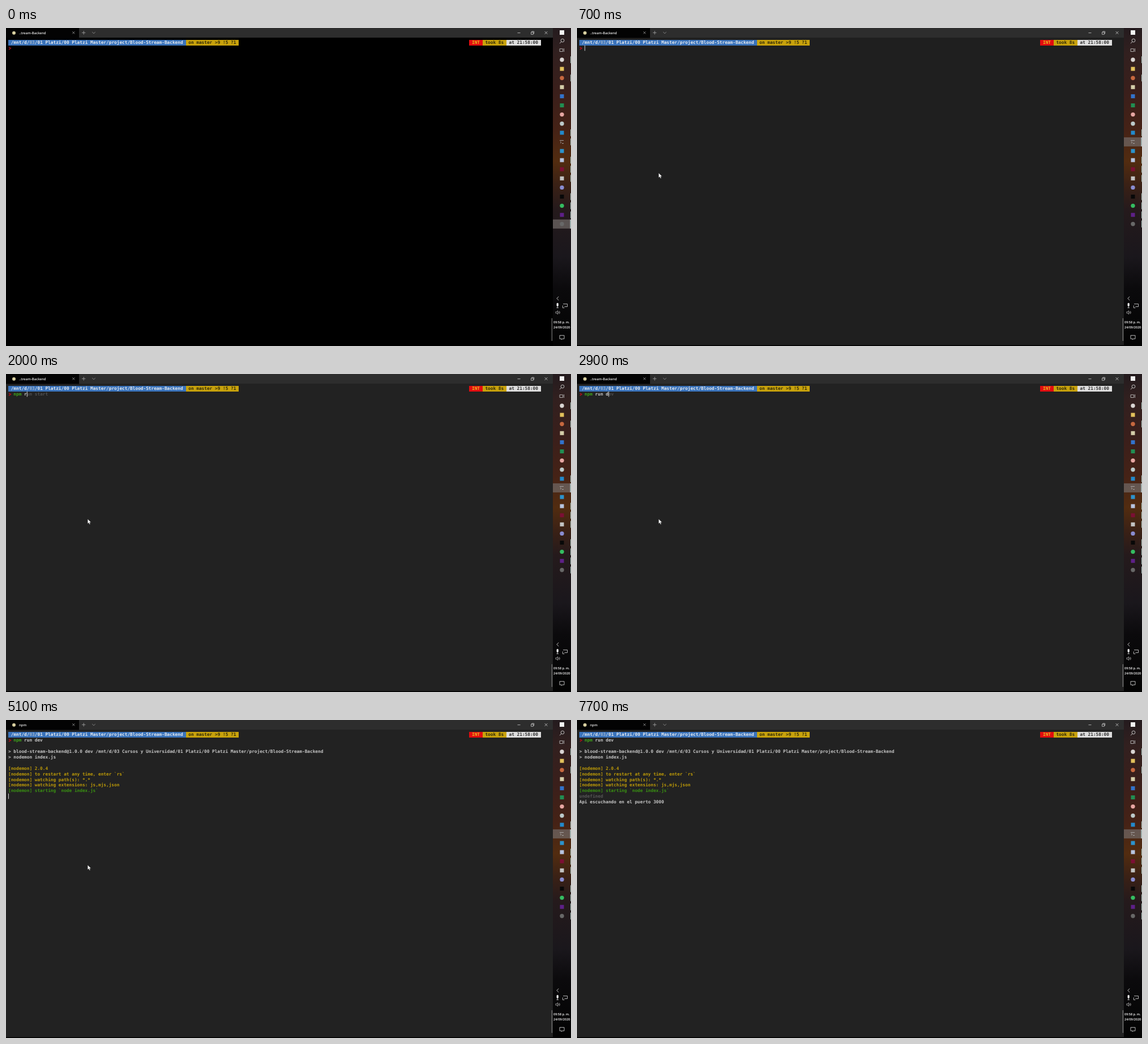
These frames come from a looping animation (998x561 px, 7800 ms). An HTML page:

```html
<!DOCTYPE html>
<html lang="es">
<head>
<meta charset="utf-8">
<title>Terminal</title>
<style>
  html, body { margin: 0; width: 100%; height: 100%; overflow: hidden; background: #000; }
  svg { display: block; width: 998px; height: 561px; }
  text { white-space: pre; text-rendering: geometricPrecision; }
  .mono { font: bold 7.774px "DejaVu Sans Mono", monospace; }
  .ui { font-family: "Open Sans", "Noto Sans", sans-serif; font-weight: 600; }
</style>
</head>
<body>
<svg id="stage" viewBox="0 0 998 561">
  <defs>
    <linearGradient id="wall" x1="0" y1="0" x2="0" y2="1">
      <stop offset="0" stop-color="#241b1e"/>
      <stop offset=".08" stop-color="#32201f"/>
      <stop offset=".2" stop-color="#3a1f1b"/>
      <stop offset=".32" stop-color="#452216"/>
      <stop offset=".42" stop-color="#522c10"/>
      <stop offset=".5" stop-color="#382016"/>
      <stop offset=".57" stop-color="#251a1c"/>
      <stop offset=".72" stop-color="#1a171c"/>
      <stop offset=".82" stop-color="#0b0a0c"/>
      <stop offset="1" stop-color="#030303"/>
    </linearGradient>
  </defs>
</svg>
<script>
const LOOP = 7800, STEP = 100;
const CELL = 4.68, ROW = 9.9, LEFT = 4, TOP = 25.6;
const GREY = '#c6c6c6', YELLOW = '#bd9a08', GREEN = '#3a9212';
const stage = document.getElementById('stage');

function add(tag, attrs, parent = stage) {
  const el = document.createElementNS('http://www.w3.org/2000/svg', tag);
  for (const key in attrs) el.setAttribute(key, attrs[key]);
  parent.appendChild(el);
  return el;
}
const rect = (x, y, width, height, fill) => add('rect', { x, y, width, height, fill });
const line = (d, stroke = '#ccc', width = 0.8) =>
  add('path', { d, stroke, fill: 'none', 'stroke-width': width });
const colX = col => LEFT + col * CELL;
const rowY = row => TOP + row * ROW;

function print(col, row, str, fill = GREY) {
  const el = add('text', { x: colX(col), y: rowY(row) + 2.75, fill, class: 'mono' });
  el.textContent = str;
  return el;
}
function label(x, y, str, size, fill = '#eee') {
  const el = add('text', { x, y, fill, 'font-size': size, class: 'ui' });
  el.textContent = str;
  return el;
}
function segment(col, str, back, fore) {
  const box = rect(colX(col), 20.5, str.length * CELL, 10.2, back);
  box.setAttribute('shape-rendering', 'crispEdges');
  print(col, 0, str, fore);
}
const show = (el, on) => el.setAttribute('visibility', on ? 'visible' : 'hidden');

// Window
const screen = rect(0, 0, 966, 559.5, '#000');
rect(0, 0, 966, 17, '#2d2d2d');
rect(0, 0, 129, 17.5, '#030303');
add('circle', { cx: 14, cy: 8.8, r: 3, fill: '#d8cfa0' });
const title = label(23, 10.8, '', 6);
line('M117.3 6.3l4 4m0-4l-4 4', '#aaa');
line('M134 8.3h6.4m-3.2-3.2v6.4', '#aaa');
line('M152.2 7l2.8 2.7 2.8-2.7', '#999');
line('M903.5 8.6h5', '#ccc');
line('M927.5 7.4h3.8v3.8h-3.8zM928.8 7.2v-1.2h3.8v3.9h-1.2', '#ccc');
line('M951.6 6l4.8 4.8m0-4.8l-4.8 4.8', '#ccc');

// Prompt
const BLUE = '#3a73bb', GOLD = '#c8a20c';
segment(0, ' /mnt/d/', BLUE, '#e6ebf0');
segment(8, '03', BLUE, '#9fb4cd');
segment(10, '/01 Platzi/00 Platzi Master/project/Blood-Stream-Backend ', BLUE, '#e6ebf0');
segment(67, ' on master >9 !5 ?1 ', GOLD, '#302a08');
segment(174, ' INT ', '#e20c10', '#e8c020');
segment(179, ' took 8s ', GOLD, '#302a08');
segment(188, ' at 21:58:00 ', '#dedede', '#2e2e2e');
const mark = line('M5 33.6l3.4 2.2-3.4 2.2', '#a81018', 1.5);

// Command line
const command = print(2, 1, '');
const cmdName = add('tspan', {}, command);
const cmdArgs = add('tspan', { fill: GREY }, command);
const hint = add('tspan', { fill: '#505050' }, command);

const TYPING = [
  [1300, 'n'], [1500, 'np'], [1700, 'npm'], [1800, 'npm '], [2000, 'npm r'],
  [2200, 'npm ru'], [2400, 'npm run'], [2600, 'npm run '], [2900, 'npm run d'],
  [3100, 'npm run de'], [3300, 'npm run dev']
];
const FOCUS = 700, ENTER = 3900;

// Output: time, row, text, colour
const NOTE = '[nodemon] ';
const OUTPUT = [
  [4500, 3, '> blood-stream-backend@1.0.0 dev /mnt/d/03 Cursos y Universidad/01 Platzi/00 Platzi Master/project/Blood-Stream-Backend', GREY],
  [4500, 4, '> nodemon index.js', GREY],
  [4900, 6, NOTE + '2.0.4', YELLOW],
  [4900, 7, NOTE + 'to restart at any time, enter `rs`', YELLOW],
  [4900, 8, NOTE + 'watching path(s): *.*', YELLOW],
  [4900, 9, NOTE + 'watching extensions: js,mjs,json', YELLOW],
  [4900, 10, NOTE + 'starting `node index.js`', GREEN],
  [6200, 11, 'undefined', '#565656'],
  [6200, 12, 'Api escuchando en el puerto 3000', GREY]
].map(([at, row, str, fill]) => ({ at, row, el: print(0, row, str, fill) }));

const caret = rect(0, 0, 1, 9.6, '#d0d0d0');
rect(963.8, 512, 1.1, 40, '#858585');

// Taskbar
rect(966, 0, 32, 561, 'url(#wall)');
const active = rect(966, 0, 32, 16, '#716a67');
active.setAttribute('opacity', 0.72);
const activeEdge = rect(996.4, 0, 1.6, 16, '#b9c3c8');

rect(978, 4, 8, 8, '#f2f2f2');
add('circle', { cx: 983, cy: 22, r: 2.9, fill: 'none', stroke: '#ccc', 'stroke-width': 0.9 });
line('M981 24.2l-3 3', '#ccc', 1);
line('M978 36.7h5.5v4.8h-5.5zM985.5 36v6', '#bbb', 0.9);

// Icon shapes from top to bottom: c = circle, s = square
const ICONS = [
  'c#d9d5d3', 's#e3c15c', 'c#c7683f', 's#d4cda9', 's#3273cc', 's#218e52', 'c#e6a6a2',
  'c#bccaca', 's#2389cb', '', 's#2c93cd', 's#b7c4df', 's#7c0f34', 's#c3c3c3',
  'c#898cd0', 's#080808', 'c#35bd61', 's#5e2088', 'c#686868'
];
const iconY = i => 56 + i * 16.1;
const RUNNING = [0, 2, 8, 9, 11, 12, 13, 15, 16, 17, 18];
ICONS.forEach((icon, i) => {
  const fill = icon.slice(1), y = iconY(i);
  if (icon[0] === 'c') add('circle', { cx: 982, cy: y, r: 3.7, fill });
  else if (icon) rect(978.5, y - 3.5, 7, 7, fill);
});
line('M978 198.4h7M979 200.2l1.7 1.6-1.7 1.6M982 203.6h3', '#b5b5b5', 0.9);
RUNNING.forEach(i => rect(997, iconY(i) - 6, 1, 12, '#a4c0ba'));

// Tray
line('M976.2 473.8l-3.4 3.3 3.4 3.3', '#ccc', 0.9);
add('rect', { x: 972.6, y: 485, width: 3.2, height: 6, rx: 1.6, fill: '#eee' });
line('M974.2 491v2.6m-1.8 0h3.6', '#ddd');
line('M984 486.8h7.6v4.8h-5.2M983.3 489.5v4.2h3', '#ccc', 0.9);
line('M971 500.6h1.6l2-1.8v6.2l-2-1.8h-1.6zM976 500.4q1.2 1.5 0 3M977.4 499.4q2 2.5 0 5', '#ccc', 0.7);
label(967, 521, '09:58 p. m.', 5.5, '#fff');
label(967, 529.5, '24/09/2020', 5.5, '#fff');
line('M978 542.3h8v6h-3.2l-1.4 1.6v-1.6h-3.4z', '#ccc', 0.9);

const pointer = add('path', {
  d: 'M0 0v8l1.9-1.7 1.2 2.9 1.4-.6-1.2-2.8h2.6z',
  fill: '#fff', stroke: '#222', 'stroke-width': 0.3
});

function background(t) {
  if (t < FOCUS) return '#000';
  return t < FOCUS + 100 ? '#1f1f1f' : '#222';
}

// The pointer comes in from the left edge, rests, and goes back out
function movePointer(t) {
  const ramp = from => Math.min(1, Math.max(0, (t - from) / 300));
  const rest = 1 - (1 - ramp(200)) ** 2 - ramp(7200) ** 2;
  pointer.setAttribute('transform', `translate(${-8 + 152.3 * rest} ${286 - 30 * rest})`);
}

function render(t) {
  screen.setAttribute('fill', background(t));
  mark.setAttribute('stroke', t < FOCUS ? '#8c1016' : '#a81018');
  title.textContent = t < ENTER ? '..tream-Backend' : 'npm';
  movePointer(t);

  const activeY = iconY(t < FOCUS ? 18 : 9) - 8;
  active.setAttribute('y', activeY);
  activeEdge.setAttribute('y', activeY);

  let typed = '', keyTime = FOCUS;
  for (const [at, str] of TYPING) if (t >= at) [keyTime, typed] = [at, str];
  const full = typed.length > 8 ? 'npm run dev' : 'npm run start';
  cmdName.textContent = typed.slice(0, 3);
  cmdName.setAttribute('fill', typed.length < 3 ? '#c02028' : '#3fa51a');
  cmdArgs.textContent = typed.slice(3);
  hint.textContent = typed && t < ENTER ? full.slice(typed.length) : '';

  let row = 1, col = 2 + typed.length;
  if (t >= ENTER) { row = 2; col = 0; keyTime = ENTER; }
  for (const out of OUTPUT) {
    const on = t >= out.at;
    show(out.el, on);
    if (on) row = out.row + 1;
  }
  caret.setAttribute('x', colX(col));
  caret.setAttribute('y', rowY(row) - 4.8);
  show(caret, t >= FOCUS && (t - keyTime) % 1060 < 530);
}

const start = performance.now();
function tick() {
  const t = (performance.now() - start) % LOOP;
  render(Math.floor(t / STEP) * STEP);
  requestAnimationFrame(tick);
}
tick();
</script>
</body>
</html>
```
